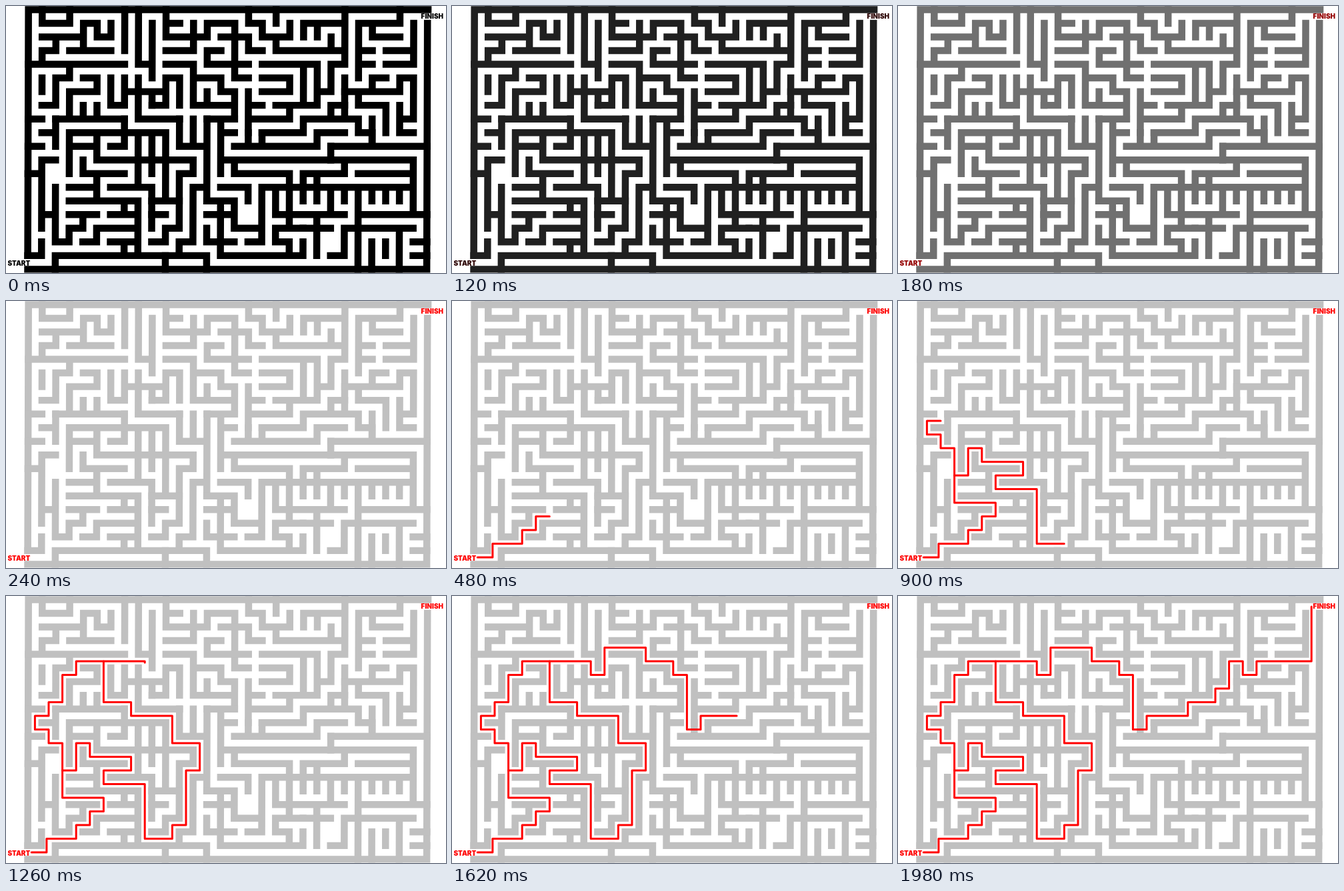
Recreate the animation shown at these times as an HTML page. Size 660 by 401 pixels, loop 2.01 s.

```html
<!DOCTYPE html>
<html lang="en">
<head>
<meta charset="utf-8">
<title>Maze</title>
<style>
  html, body { margin: 0; width: 100%; height: 100%; overflow: hidden; background: #fff; }
  svg { display: block; }
  text { font: 900 10px Inter, "Liberation Sans", sans-serif; }
</style>
</head>
<body>
<svg width="660" height="401" viewBox="0 0 660 401">
  <!-- Walls are drawn in grid units, one unit per maze cell; the grid leans slightly. -->
  <g id="walls" transform="matrix(20.64 0 -.06 20.52 33.7 5.5)" fill="none"
     stroke-width=".51" stroke-linecap="square">
    <path d="M0 18V0H29.04M29 1V19H0"/>
    <!-- top left -->
    <path d="M1 0V1H2M3 0V1H2.5M4 2V1H5M1 2H4V3M5 1V2H6V1M7 0V3M8 0V4H9M9 1V5M1 4V3H2V2
      M3 3H6M0 4H7M3 4V5H2V7H1M1 5V6M4 5H5V6H3V8M4 7V8M5 7V8M6 5V7H7V5
      M8 5V8H11M0 8H1M2 8H7M7 6H10M9 6V7"/>
    <!-- top centre -->
    <path d="M10 0V2H13M10 1H11M12 1V3M13 1V2M10 3H12M13 4V3H14M14 2H15M13 4H15M10 4H12V5H14V6H15
      M13 1H15V5H16M10 7V5H11V7M9 7H10M12 5V7H15M13 6V7M15 6V8"/>
    <path d="M16 0V1H17V2M15 2H16V3H17M15 4H16M18 0V1M17 2H19V1M18 2V3H20M17 4H21V7H19V8H16
      M20 4V7H18M17 5H19V6H17M16 7H17M16 6V9M20 2V1H23M21 1V2M22 2V3M20 3H23M23 0V4H22V6H21
      M20 8H22V7H23V5M17 9H20V8"/>
    <!-- top right -->
    <path d="M27 0V1H24V5M25 1V2H27M24 3H25M24 4H25M26 3H28M28 1V4H26M25 6V5H26M27 6V5H28V8H27V7
      M23 6H25M25 6H27M24 6V7H26V9M25 8V10M22 8H24V9H25M27 8V9H28M23 7V8"/>
    <!-- bottom left -->
    <path d="M2 8V10M1 9H2M0 10H1M1 11H2M0 12H1M1 11V16M2 13V17H3V16H4V15M3 15H5M1 15H2
      M1 17V18H0M2 19V18H8M3 12V9H6.5M3 10H5V11M5 9V10M6 10H7V9M4 11V12H7M5 11H12V12H11V16
      M8 9V11M9 9V12M8 11V13M3 13H5V12M5 13V14M6 13H9V16M3 14H8V18H10V19M6 15H8
      M7 14V15M5 17V16H8M4 17H5M6 17H8M7 17V18"/>
    <path d="M7 8V9H10V11M11 8V10H13M12 8V10M13 8V14M10 11V14M9 14H11M9 15H10M12 13H13
      M12 13V17H11V18M11 16H10V17H9M10 18H13V19"/>
    <!-- bottom centre -->
    <path d="M13 8H14V12M14 8H15M14 9H15M15 10H21V9H23M17 9V10M16 9V10M14 11H22V10
      M15 11V12H19V14M14 13H16V14M17 14V13H18V15H19M13 14H15V16M14 14V18H20V17M13 15H15
      M13 16V17H15M17 14V16H15M17 16V17H16M18 16V17H19V18M18 16H20M19 14V16"/>
    <!-- bottom right -->
    <path d="M22 11H28V15M20 12H23V11M24 12H28M18 13H28M20 12V14M21 12V14M22 13V15M19 15H23
      M23 13V14M24 13V16M25 13V14M26 13V14M27 13V14M24 15H29M23 16H28M21 15V18M20 16H22M22 18H23V16
      M24 17V19M25 17V19M26 17V18M27 16V19M29 17H28M29 18H28M24 16V17M22 10H29M25 10V9"/>
  </g>
  <g fill="none" stroke-width="3" stroke="#f00" stroke-linejoin="round" stroke-linecap="round">
    <path id="route"/>
    <path id="detour"/>
  </g>
  <text x="2.4" y="389.6">START</text>
  <text x="622.6" y="19.4">FINISH</text>
</svg>
<script>
const LOOP = 2010, STEP = 60;
const $ = id => document.getElementById(id);
const labels = document.querySelectorAll("text");

// Turns like "u2 r1" walk through cell centres from a starting cell.
function makeTrail(id, x, y, turns) {
  const moves = { u: [0, -1], d: [0, 1], l: [-1, 0], r: [1, 0] };
  const point = () => `${43.4 + 20.6 * x} ${16 + 20.5 * y}`;
  let d = "M" + point(), total = 0;
  for (const turn of turns.split(" ")) {
    const size = +turn.slice(1), [dx, dy] = moves[turn[0]];
    x += dx * size;
    y += dy * size;
    total += size;
    d += "L" + point();
  }
  const el = $(id);
  el.setAttribute("d", d);
  el.setAttribute("pathLength", total);
  return length => {
    el.style.visibility = length > 0 ? "visible" : "hidden";
    el.setAttribute("stroke-dasharray", `${Math.min(length, total)} ${total * 2}`);
  };
}

const drawRoute = makeTrail("route", -.25, 18,
  "r1.1 u1 r2.15 u1 r1 u1 r1 u1 l3 u4 l1 u1 l1 u1 r1 u1 r1 u2 r1 u1 r5 d1 r1 u2 r3 d1 r2 d1 r1 d4 " +
  "r1 u1 r3 u1 r2 u1 r1 u2 r1 d1 r1 u1 r4 u4");
const drawDetour = makeTrail("detour", 2, 12,
  "r1 u2 r1 d1 r3 d1 l2 d1 r3 d4 r2 u1 r1 u4 r1 u2 l2 u2 l3 u1 l2 u3");

// Piecewise linear value through [time, value] keys.
function along(keys, t) {
  if (t <= keys[0][0]) return keys[0][1];
  for (let i = 1; i < keys.length; i++) {
    const [t0, v0] = keys[i - 1], [t1, v1] = keys[i];
    if (t <= t1) return v0 + (v1 - v0) * (t - t0) / (t1 - t0);
  }
  return keys[keys.length - 1][1];
}

const fadeKeys = [[60, 0], [120, 1 / 6], [240, 1]];
const routeKeys = [[240, 0], [480, 8.25], [570, 14.25], [900, 21.25], [1140, 27.25],
  [1260, 32.35], [1680, 56.3], [1980, 72.5]];
const detourKeys = [[570, 0], [900, 21], [1250, 43]];

function render(time) {
  const t = Math.floor((time % LOOP) / STEP) * STEP;
  const fade = along(fadeKeys, t);
  const grey = Math.round(192 * fade);
  $("walls").setAttribute("stroke", `rgb(${grey},${grey},${grey})`);
  labels.forEach(label => label.setAttribute("fill", `rgb(${Math.round(255 * fade)},0,0)`));
  drawRoute(along(routeKeys, t));
  drawDetour(along(detourKeys, t));
}

const start = performance.now();
function tick() {
  render(performance.now() - start);
  requestAnimationFrame(tick);
}
tick();
</script>
</body>
</html>
```
